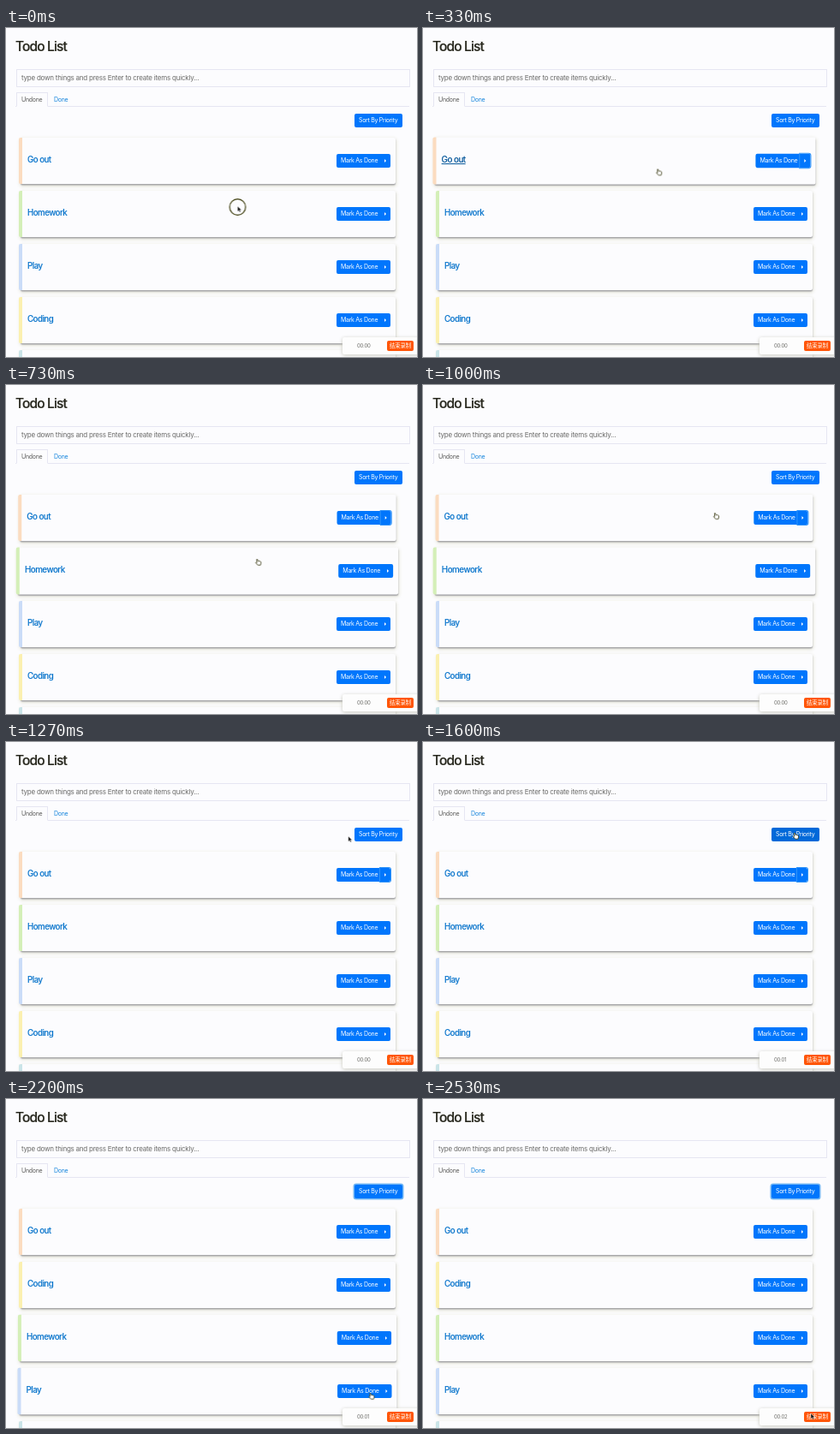
Recreate the animation shown at these times as an HTML page. Size 480 by 384 pixels, loop 2.59 s.

```html
<!DOCTYPE html>
<html lang="en">
<head>
<meta charset="utf-8">
<title>Todo List</title>
<style>
  :root { --loop: 2590ms; --blue: #0076fc; --line: #e6e6f2; --link: #0c76cc; }
  * { box-sizing: border-box; }
  html, body { margin: 0; width: 100%; height: 100%; overflow: hidden; background: #fcfcfe; }
  body { position: relative; font: 7px/16px Inter, "Open Sans", sans-serif; letter-spacing: -.042em; }
  body *, .arrow, .hand { position: absolute; white-space: nowrap; }
  h1, h2 { margin: 0; font-weight: 500; }
  h1 { left: 11px; top: 10px; font-size: 15.5px; line-height: 24px; letter-spacing: -.055em; color: #26261c; -webkit-text-stroke: .2px; }

  .input { left: 11.5px; top: 47.5px; width: 460px; height: 21px; padding-left: 5.5px;
    border: 1px solid var(--line); font-size: 8px; line-height: 19px; letter-spacing: -.029em; color: #6a6a68; }
  .tabs { left: 11px; top: 91px; width: 460px; height: 1px; background: var(--line); }
  .tab { top: 75px; height: 17px; line-height: 17px; }
  .on { left: 12px; width: 37px; padding-left: 5px; border: 1px solid var(--line);
    border-bottom-color: #fcfcfe; line-height: 15px; color: #5a5a58; }
  .off { left: 56px; color: #1484dc; }

  .btn { height: 16px; background: var(--blue); border-radius: 2px; color: #fff; padding-left: 5px; }
  .sort { left: 407px; top: 100px; width: 56px; animation: press var(--loop) infinite, ring var(--loop) step-end infinite; }
  .mark { left: 369px; top: 19px; width: 63px; }
  .caret { right: 0; top: 0; width: 12px; height: 16px; border-radius: 0 2px 2px 0; }
  .caret::after { content: ""; position: absolute; left: 5px; top: 6px;
    border: 2px solid transparent; border-left: 2.5px solid #fff; border-right: 0; }
  .focus { animation: focus var(--loop) step-end infinite; }

  .card { left: 17px; top: calc(128px + 62px * var(--i)); width: 438px; height: 54px;
    background: #fcfcfe; border-radius: 2px;
    box-shadow: 0 1.5px 1.5px #a0a0a4, 0 2px 4px 1px #e9e9dc;
    animation: var(--hover, none) var(--loop) infinite, sort var(--loop) step-end infinite; }
  .card::before { content: ""; position: absolute; left: -2px; top: 0; width: 3.5px; height: 54px;
    border-radius: 2px 0 0 2px; background: var(--tag); }
  h2 { left: 8px; top: 18px; font-size: 9.7px; line-height: 16px; letter-spacing: -.052em;
    color: var(--link); -webkit-text-stroke: .12px; }
  .link { text-decoration: underline transparent 1px; text-underline-offset: 1px;
    animation: underline var(--loop) step-end infinite; }

  .recorder { left: 393px; top: 361px; width: 90px; height: 20px; background: #fdfdfd;
    border-radius: 2px; box-shadow: 0 1px 4px #c6c6bc; }
  .clock { left: 17px; top: 4px; width: 20px; height: 12px; overflow: hidden; font-size: 6px; line-height: 12px; color: #70706c; }
  .digits { white-space: pre; animation: tick var(--loop) step-end infinite; }
  .stop { left: 52px; top: 4px; width: 31px; height: 12px; border-radius: 2px; background: #ff5608; color: #fff;
    font: 6.3px/12px "Noto Sans CJK SC", "Noto Sans CJK", sans-serif; letter-spacing: 0; text-align: center; }

  .cursor { left: 0; top: 0; width: 24px; height: 24px; overflow: visible; animation: move var(--loop) infinite linear; }
  .arrow { animation: arrow var(--loop) step-end infinite; }
  .hand { animation: hand var(--loop) step-end infinite; }
  .halo { animation: halo var(--loop) step-end infinite; }

  @keyframes move {
    0%, 2.7% { transform: translate(270.5px, 208px); }
    9% { transform: translate(272px, 179px); }
    15%, 20.46% { transform: translate(274px, 156px); }
    25% { transform: translate(282px, 194px); }
    30% { transform: translate(298px, 208px); }
    35% { transform: translate(322px, 187px); }
    38.61% { transform: translate(339.7px, 149.5px); }
    42% { transform: translate(368px, 124px); }
    49.03% { transform: translate(399.5px, 110px); }
    56%, 70% { transform: translate(433px, 106px); }
    74.52% { transform: translate(432px, 217px); }
    79% { transform: translate(429px, 277px); }
    84.94% { transform: translate(424.3px, 343px); }
    93%, 100% { transform: translate(453px, 367px); }
  }
  @keyframes arrow {
    0%, 41.5%, 88% { opacity: 1; }
    5%, 52% { opacity: 0; }
    100% { opacity: 1; }
  }
  @keyframes hand {
    0%, 41.5%, 88% { opacity: 0; }
    5%, 52% { opacity: 1; }
    100% { opacity: 0; }
  }
  @keyframes halo { 0% { opacity: 1; } 5%, 100% { opacity: 0; } }

  @keyframes first {
    0%, 8.5%, 32%, 36.5%, 48%, 100% { scale: 1; }
    17%, 24% { scale: 1.02; }
    38.61% { scale: 1.002; }
    41.5% { scale: 1.011; }
  }
  @keyframes homework {
    0%, 3%, 11%, 24.5%, 45%, 78.5%, 88%, 100% { scale: 1; }
    6% { scale: 1.006; }
    33%, 36.5% { scale: 1.02; }
    38.61% { scale: 1.015; }
    82% { scale: 1.01; }
    84.94% { scale: 1.005; }
  }
  @keyframes play {
    0%, 82%, 94%, 100% { scale: 1; }
    84.94% { scale: 1.007; }
    88% { scale: 1.014; }
  }
  @keyframes coding {
    0%, 74.52%, 84%, 100% { scale: 1; }
    79% { scale: 1.01; }
  }
  @keyframes sort {
    0% { translate: 0 0; }
    70%, 100% { translate: 0 var(--dy, 0px); }
  }
  @keyframes underline {
    0%, 24%, 100% { color: var(--link); text-decoration-color: transparent; }
    11% { color: #0a5a9c; text-decoration-color: #0a5a9c; }
  }
  @keyframes press {
    0%, 54%, 79%, 100% { background: #0076fc; }
    60%, 68% { background: #0069d9; }
    71%, 74.52% { background: #0562a8; }
  }
  @keyframes ring {
    0% { box-shadow: none; }
    69%, 100% { box-shadow: 0 0 0 1.5px #72b6f4; }
  }
  @keyframes focus {
    0% { box-shadow: none; }
    5% { box-shadow: 0 0 0 1px #2f93f8; }
    69%, 100% { box-shadow: none; }
  }
  @keyframes tick {
    0% { transform: none; }
    56.4% { transform: translateY(-12px); }
    95%, 100% { transform: translateY(-24px); }
  }
</style>
</head>
<body>
  <h1>Todo List</h1>
  <div class="input">type down things and press Enter to create items quickly...</div>
  <div class="tabs"></div>
  <div class="tab on">Undone</div>
  <div class="tab off">Done</div>
  <div class="btn sort">Sort By Priority</div>

  <div class="card" style="--i:0; --tag:#fbdcc0; --hover:first">
    <h2 class="link">Go out</h2><div class="btn mark">Mark As Done<i class="caret focus"></i></div>
  </div>
  <div class="card" style="--i:1; --tag:#d4efb8; --hover:homework; --dy:62px">
    <h2>Homework</h2><div class="btn mark">Mark As Done<i class="caret"></i></div>
  </div>
  <div class="card" style="--i:2; --tag:#cadcf8; --hover:play; --dy:62px">
    <h2>Play</h2><div class="btn mark">Mark As Done<i class="caret"></i></div>
  </div>
  <div class="card" style="--i:3; --tag:#fbf0b0; --hover:coding; --dy:-124px">
    <h2>Coding</h2><div class="btn mark">Mark As Done<i class="caret"></i></div>
  </div>
  <div class="card" style="--i:4; --tag:#cae4e8"></div>

  <div class="recorder">
    <div class="clock"><div class="digits">00:00
00:01
00:02</div></div>
    <div class="stop" lang="zh-CN">结束录制</div>
  </div>

  <svg class="cursor" viewBox="0 0 24 24">
    <circle class="halo" cx="0" cy="1" r="9.3" fill="none" stroke="#3c3c0c" stroke-width="1.2"/>
    <path class="arrow" d="M0 0V6.2L1.5 4.9L2.5 7.1L3.6 6.6L2.6 4.5H4.5Z" fill="#111" stroke="#fff" stroke-width=".4"/>
    <path class="hand" d="M.3 .6Q1-.3 1.6 .7L2.2 2.6Q3.6 2.1 4.9 3Q5.8 3.4 5.5 5L4.9 7.2H1.7L-.7 4.4Q-.5 3.4 .8 4.2Z"
      fill="#fff" stroke="#33330c" stroke-width=".8" stroke-linejoin="round"/>
  </svg>
</body>
</html>
```
